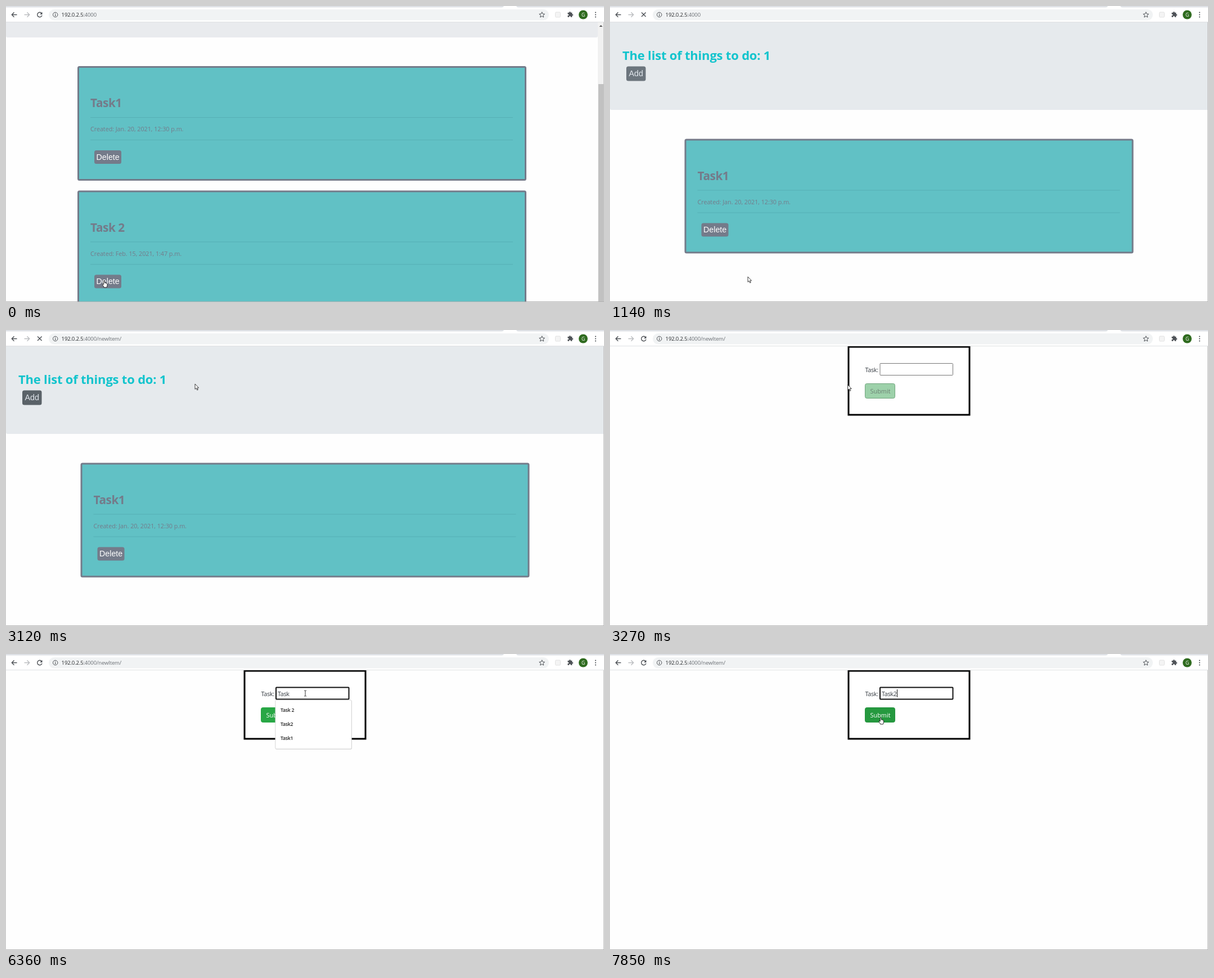
Write an HTML page that moves like this. It is 1063 by 527 pixels and loops after 8000 ms.

```html
<!DOCTYPE html>
<html lang="en">
<head>
<meta charset="utf-8">
<title>To-do list</title>
<style>
  html, body { margin: 0; width: 100%; height: 100%; overflow: hidden; background: #fff; }
  svg { display: block; width: 1063px; height: 527px; }
  text { font-family: "Open Sans", "Noto Sans", sans-serif; white-space: pre; }
  .head { font-size: 22px; font-weight: 700; letter-spacing: -.2px; fill: #12c4cd; }
  .title { font-size: 20.8px; font-weight: 700; letter-spacing: -.45px; fill: #747b8a; }
  .date { font-size: 10.8px; letter-spacing: -.05px; fill: #747b8a; }
  .btn { font-family: "Liberation Sans", Arial, sans-serif; font-size: 14.2px; fill: #fff; }
  .body { font-size: 10.8px; letter-spacing: -.3px; fill: #343a40; }
  .send { font-size: 10.9px; }
  .hint { font-size: 8.7px; font-weight: 600; letter-spacing: -.25px; fill: #222; }
  .url { font-size: 9.5px; letter-spacing: -.15px; fill: #6b6f74; }
  .icon { fill: none; stroke: #4d5156; stroke-width: 1.4; }
</style>
</head>
<body>
<svg id="stage" viewBox="0 0 1063 527"></svg>
<script>
const LOOP = 8000;
const GREY = '#747b8a';

const rect = (x, y, w, h, fill, more = '') =>
  `<rect x="${x}" y="${y}" width="${w}" height="${h}" fill="${fill}" ${more}/>`;
const text = (x, y, cls, str, more = '') =>
  `<text x="${x}" y="${y}" class="${cls}" ${more}>${str}</text>`;
const group = (id, inner) => `<g id="${id}">${inner}</g>`;

const card = (x, y, title, date, extra = '') => `<g transform="translate(${x} ${y})">
  ${rect(1.5, 1.5, 795, 201, '#61c1c5', `rx="2" stroke="${GREY}" stroke-width="3"`)}
  ${text(23, 73, 'title', title)}
  ${rect(23, 91, 751, 1, '#57b0b5')}
  ${text(23, 116, 'date', 'Created: ' + date)}
  ${rect(23, 131, 751, 1, '#57b0b5')}
  ${extra}
  ${rect(30, 150, 48, 24, GREY, 'rx="3.5"')}
  ${text(33.6, 166.8, 'btn', 'Delete')}
</g>`;

const first = ['Task1', 'Jan. 20, 2021, 12:30 p.m.'];
const ring = rect(29, 149, 50, 26, 'none', 'id="ring" rx="4.5" stroke="#5f8f99" stroke-width="2"');

const scrolled = group('scrolled',
  `<path d="M0 28H1052V53q0 3-3 3H3q-3 0-3-3z" fill="#e9ebee"/>` +
  card(127, 107, ...first) +
  card(127, 328.5, 'Task 2', 'Feb. 15, 2021, 1:47 p.m.', ring) +
  rect(1052, 29, 11, 498, '#f1f1f1') + rect(1053, 139, 9.5, 388, '#c1c1c1') +
  '<path d="M1054.5 37l3-3 3 3z" fill="#505050"/>');

const top1 = group('list',
  `<path d="M0 28H1063V185H3q-3 0-3-3z" fill="#e6eaed"/>` +
  text(22, 96, 'head', 'The list of things to do: 1') +
  rect(29, 107.5, 34.5, 26, '#6c757d', 'id="add" rx="3.5"') +
  text(33.6, 125, 'btn', 'Add', 'style="fill:#e3e8ee"') +
  card(132.5, 236.5, ...first));

const form = group('form',
  rect(424, 30, 215, 121, '#fff', 'stroke="#000" stroke-width="3"') +
  text(453.5, 74.5, 'body', 'Task:') +
  rect(480, 59.5, 129.5, 21, '#fff', 'id="field" rx="1"') +
  text(483, 74.5, 'body', '', 'id="typed"') +
  rect(0, 63, 1, 14, '#111', 'id="caret"') +
  rect(453.5, 95.5, 53, 26, '#28a745', 'id="submit" rx="3"') +
  text(462.5, 113, 'send', 'Submit', 'id="label"') +
  group('hints', '') );

const arrow = '<path d="M0 0V9.4L2.2 7.5 3.8 11 5.3 10.3 3.8 7H6.6z" fill="#fff" stroke="#111" stroke-width=".8"/>';
const hand = `<path d="M-1.8 1V-4.8q0-1.2 1-1.2t1 1.2V-2q1-.6 1.5.4 1-.5 1.5.5 1.3-.4 1.3 1V2.4Q4.400 4 3.500 6H-1.400Q-2 4-4 1.400-4.300 0-3.200 0z"
  fill="#fff" stroke="#111" stroke-width=".9" stroke-linejoin="round"/>`;
const beam = '<path d="M-2-5H-.5L0-4.500.5-5H2M0-4.500V4.500M-2 5H-.5L0 4.500.5 5H2" fill="none" stroke="#333"/>';
const shapes = { arrow, hand, beam };

const toolbar =
  rect(0, 0, 1063, 28, '#fff') + rect(0, 0, 1063, 2.5, '#dee1e6') +
  '<path d="M881 3q3-.5 4-3H907q1 2.500 4 3z" fill="#fff"/>' +
  rect(0, 28, 1063, 1, '#dfe1e3') +
  rect(76, 6, 889, 19.500, '#f1f3f4', 'rx="9.75"') +
  '<path class="icon" d="M19.500 15.500H10.500M14.500 11.300L10.300 15.500 14.500 19.700"/>' +
  '<path class="icon" style="stroke:#bbbdc0" d="M32.500 15.500H41.500M37.500 11.300L41.700 15.500 37.500 19.700"/>' +
  group('reload', '<path class="icon" d="M63.300 13A4.200 4.200 0 1 0 64 16.600"/><path d="M64.500 10.700V14.900H60.300z" fill="#4d5156"/>') +
  group('stop', '<path class="icon" d="M56 11.500L63.600 19.100M63.600 11.500L56 19.100"/>') +
  '<circle class="icon" style="stroke-width:1" cx="87.700" cy="15.500" r="4.200"/>' +
  rect(87.1, 15, 1.2, 3, '#4d5156') + rect(87.1, 12.9, 1.2, 1.2, '#4d5156') +
  `<text x="98.600" y="19" class="url"><tspan fill="#26282b">192.0.2.5</tspan><tspan>:4000</tspan><tspan id="path"></tspan></text>` +
  '<path class="icon" style="stroke-width:1" d="M952.700 10.700L954.100 14 957.600 14.300 954.900 16.600 955.700 20 952.700 18.200 949.700 20 950.500 16.600 947.800 14.300 951.300 14z"/>' +
  rect(976.5, 11, 9, 9, '#f4f4f4', 'rx="1.500" stroke="#e2e2e2"') +
  `<path transform="translate(997.500 9.500) scale(.47)" fill="#4d5156" d="M20.500 11H19V7c0-1.100-.9-2-2-2h-4V3.500a2.500 2.500 0 0 0-5 0V5H4c-1.100 0-2 .9-2 2v3.800h1.500a2.700 2.700 0 0 1 0 5.400H2V20c0 1.100.9 2 2 2h3.800v-1.500a2.700 2.700 0 0 1 5.400 0V22H17c1.100 0 2-.9 2-2v-4h1.500a2.500 2.500 0 0 0 0-5z"/>` +
  '<circle cx="1026" cy="15.500" r="8" fill="#2f6b1f"/>' +
  text(1026, 18.5, 'avatar', 'G', 'text-anchor="middle" fill="#fff" font-size="8.500"') +
  [11.5, 15.5, 19.5].map(y => `<circle cx="1048" cy="${y}" r="1.100" fill="#4d5156"/>`).join('');

document.getElementById('stage').innerHTML =
  rect(0, 0, 1063, 527, '#fefefe') + scrolled + top1 + form + toolbar +
  rect(1062, 29, 1, 498, '#c4c4c4') + rect(0, 526, 1063, 1, '#b4b4b4') + group('cursor', '');

const $ = id => document.getElementById(id);

// Each track lists [start time, value]; a value holds until the next entry.
const tracks = {
  scene: [[0, 'scrolled'], [1140, 'list'], [3270, 'form']],
  loading: [[0, false], [450, true], [1260, false], [2720, true], [3270, false]],
  path: [[0, ''], [2990, '/newItem/']],
  ring: [[0, false], [450, true]],
  add: [[0, '#6c757d'], [2060, '#5a6268']],
  submit: [[0, ['#9dd1aa', '#70a57d', '#6c8074']], [3420, ['#28a745', '#28a745', '#fff']], [7700, ['#27a143', '#27a143', '#fff']], [7850, ['#25993f', '#24923d', '#fff']]],
  focus: [[0, false], [4190, true]],
  typed: [[0, ''], [5010, 'T'], [5260, 'Ta'], [5520, 'Tas'], [5940, 'Task'], [6880, 'Task2']],
  caret: [[0, false], [4190, true], [4730, false], [5010, true], [6360, false], [6880, true], [7420, false], [7850, true]],
  hints: [[0, 0], [4190, 4], [5260, 3], [6880, 0]],
  cursor: [
    [0, ['hand', 175.5, 495]], [640, ['hand', 188, 493]], [820, ['arrow', 213, 484]],
    [1000, ['arrow', 230, 482]], [1140, ['arrow', 245, 482]], [1260, ['arrow', 262, 481]],
    [1500, ['arrow', 352, 300]], [1630, ['arrow', 77, 138]], [2060, ['hand', 57, 126]],
    [2210, ['hand', 48, 122]], [2990, ['arrow', 175, 108]], [3120, ['arrow', 336, 96]],
    [3270, ['arrow', 422.7, 97.5]], [3420, ['arrow', 466, 86]], [3580, ['beam', 503, 75]],
    [3740, ['beam', 524, 71]], [3910, ['beam', 532, 70]], [7280, ['arrow', 526, 92]],
    [7420, ['arrow', 517, 110]], [7560, ['arrow', 502, 123.5]], [7700, ['hand', 487, 121]],
    [7850, ['hand', 482, 119]]
  ]
};

const at = (track, t) => track.filter(step => step[0] <= t).pop()[1];
const show = (id, on) => $(id).style.display = on ? '' : 'none';
const paint = (id, fill, stroke) => {
  $(id).setAttribute('fill', fill);
  if (stroke) $(id).setAttribute('stroke', stroke);
};

function hintList(count) {
  if (!count) return '';
  const h = 12 + count * 25.2;
  return rect(479, 82.5, 136, h, '#000', 'rx="2.500" opacity=".12"') +
    rect(478.8, 82, 135.5, h - .5, '#fff', 'rx="2" stroke="#c8c8c8" stroke-width=".7"') +
    ['Task 2', 'Task2', 'Task1', 'Test'].slice(0, count)
      .map((name, i) => text(488, 102.7 + i * 25.2, 'hint', name)).join('');
}

let shown = '';

function draw(t) {
  const s = {};
  for (const key in tracks) s[key] = at(tracks[key], t);
  const state = JSON.stringify(s);
  if (state === shown) return;
  shown = state;

  for (const id of ['scrolled', 'list', 'form']) show(id, id === s.scene);
  show('stop', s.loading);
  show('reload', !s.loading);
  show('ring', s.ring);
  $('path').textContent = s.path;
  paint('add', s.add);

  const [fill, edge, ink] = s.submit;
  paint('submit', fill, edge);
  paint('label', ink);
  paint('field', '#fff', s.focus ? '#101010' : '#767676');
  $('field').setAttribute('stroke-width', s.focus ? 2 : 1);
  $('typed').textContent = s.typed;
  const end = s.typed ? 483 + $('typed').getComputedTextLength() : 482;
  $('caret').setAttribute('x', Math.round(end));
  show('caret', s.caret);
  $('hints').innerHTML = hintList(s.hints);

  const [shape, x, y] = s.cursor;
  $('cursor').innerHTML = shapes[shape];
  $('cursor').setAttribute('transform', `translate(${x} ${y})`);
}

function tick() {
  draw(performance.now() % LOOP);
  requestAnimationFrame(tick);
}
tick();
</script>
</body>
</html>
```
